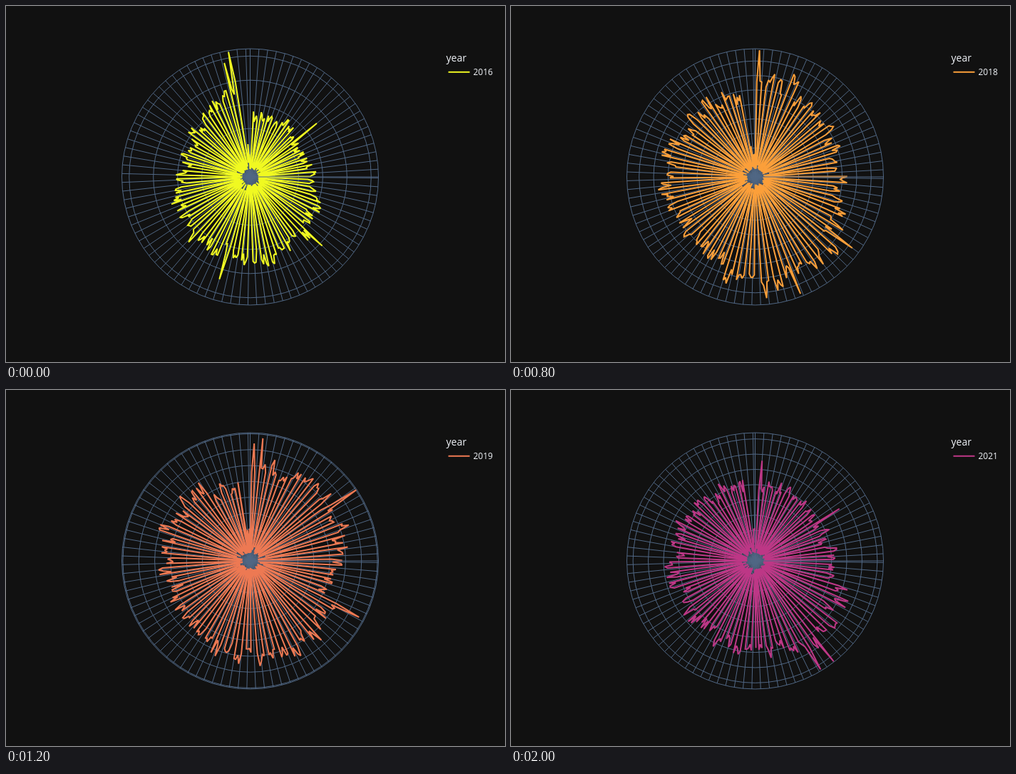
An HTML page with a canvas for the animation above (2400 ms loop, 700 by 500 pixels).

```html
<!DOCTYPE html>
<html lang="en">
<head>
<meta charset="utf-8">
<title>Daily values by year</title>
<style>
  html, body { margin: 0; width: 100%; height: 100%; overflow: hidden; background: #111; }
  canvas { display: block; }
</style>
</head>
<body>
<canvas id="stage" width="700" height="500"></canvas>
<script>
const ctx = document.getElementById('stage').getContext('2d');
const CX = 342.5, CY = 240, R = 180, TAU = Math.PI * 2;
const HOLD = 400;
const GRID = '#506784', TEXT = '#f2f5fa';
const years = [];

function seeded(seed) {
  return () => {
    seed = (seed * 1664525 + 1013904223) >>> 0;
    return seed / 4294967296;
  };
}

const angleOf = (day, days) => day / days * TAU;
const polar = (angle, r) => [CX + r * Math.sin(angle), CY - r * Math.cos(angle)];

// Day numbers of the public holidays that close offices.
function holidays(year) {
  const jan1 = new Date(year, 0, 1);
  const dayOf = (month, date) =>
    Math.round((new Date(year, month, date) - jan1) / 864e5);
  const weekday = day => (jan1.getDay() + day) % 7;
  const mondayFrom = (month, date) => {
    const day = dayOf(month, date);
    return day + (8 - weekday(day)) % 7;
  };
  const observed = day =>
    weekday(day) % 6 ? day : day + (weekday(day) ? 2 : 1);

  const moon = (19 * (year % 19) + 24) % 30;
  const shift = (2 * (year % 4) + 4 * (year % 7) + 6 * moon + 5) % 7;
  const goodFriday = dayOf(2, 20 + moon + shift);

  return new Set([
    0, observed(0), goodFriday, mondayFrom(1, 15), mondayFrom(4, 18),
    observed(dayOf(6, 1)), mondayFrom(8, 1), mondayFrom(9, 8),
    dayOf(11, 25), dayOf(11, 26)
  ]);
}

// Linear interpolation between the middles of the months.
function levelAt(months, day, days) {
  const pos = Math.min(11, Math.max(0, day / days * 12 - 0.5));
  const i = Math.min(10, Math.floor(pos));
  return months[i] + (months[i + 1] - months[i]) * (pos - i);
}

// months: typical weekly peak per month; spikes: single busy days.
function addYear(year, color, ringStep, months, spikes) {
  const days = year % 4 ? 365 : 366;
  const firstWeekday = new Date(year, 0, 1).getDay();
  const closed = holidays(year);
  const rand = seeded(year);
  const line = new Path2D();
  let week = 1;

  for (let day = 0; day < days; day++) {
    const weekday = (firstWeekday + day) % 7;
    const noise = rand();
    if (weekday === 0) week = 0.93 + 0.14 * rand();

    let r = levelAt(months, day, days) * week * (0.84 + 0.16 * noise);
    if (day >= days - 8) r = 25 + 25 * noise;
    if (weekday % 6 === 0 || closed.has(day)) r = 11 + 13 * noise * noise;
    line.lineTo(...polar(angleOf(day, days), spikes[day] || r));
  }
  years.push({ year, color, ringStep, days, line });
}

addYear(2016, '#f0f921', 33.95,
  [95, 90, 88, 100, 118, 124, 124, 122, 111, 106, 100, 138],
  { 52: 120, 136: 140, 200: 150, 353: 164, 356: 178 });

addYear(2017, '#fdca26', 19.2,
  [130, 122, 108, 128, 154, 146, 138, 114, 127, 136, 128, 132],
  { 3: 163, 51: 179, 59: 155, 134: 168, 316: 162 });

addYear(2018, '#fb9f3a', 20.35,
  [150, 132, 122, 131, 162, 164, 147, 128, 134, 129, 128, 126],
  { 2: 178, 128: 169, 161: 176, 177: 171 });

addYear(2019, '#ed7953', 22.32,
  [138, 152, 137, 120, 146, 146, 145, 123, 126, 130, 132, 112],
  { 2: 165, 6: 173, 57: 179, 119: 172 });

addYear(2020, '#d8576b', 22.2,
  [118, 132, 85, 95, 142, 146, 130, 134, 142, 142, 130, 112],
  { 7: 144, 48: 178, 61: 147, 167: 169 });

addYear(2021, '#bd3786', 21.42,
  [112, 110, 106, 130, 150, 142, 134, 122, 125, 122, 120, 112],
  { 4: 141, 59: 139, 144: 179, 151: 178 });

function stroke(color, width, path) {
  ctx.strokeStyle = color;
  ctx.lineWidth = width;
  if (path) ctx.stroke(path);
  else ctx.stroke();
}

function ring(r) {
  ctx.beginPath();
  ctx.arc(CX, CY, r, 0, TAU);
  stroke(GRID, 1);
}

function segment(x1, y1, x2, y2, color, width) {
  ctx.beginPath();
  ctx.moveTo(x1, y1);
  ctx.lineTo(x2, y2);
  stroke(color, width);
}

function label(text, x, y, size) {
  ctx.font = `${size}px "Open Sans", sans-serif`;
  ctx.fillStyle = TEXT;
  ctx.fillText(text, x, y);
}

function draw({ year, color, ringStep, days, line }) {
  ctx.fillStyle = '#111';
  ctx.fillRect(0, 0, 700, 500);

  for (let day = 0; day < days; day += 4) {
    segment(CX, CY, ...polar(angleOf(day, days), R), GRID, 1);
  }
  for (let r = ringStep; r < R; r += ringStep) ring(r);

  ctx.miterLimit = 2;
  stroke(color, 2, line);

  ring(R);
  segment(CX, CY, CX + R, CY, GRID, 1);

  label('year', 617.5, 78, 14);
  segment(620.5, 92.8, 650.5, 92.8, color, 2);
  label(year, 655.5, 97, 12);
}

function tick(now) {
  draw(years[Math.floor(now / HOLD) % years.length]);
  requestAnimationFrame(tick);
}
requestAnimationFrame(tick);
</script>
</body>
</html>
```
